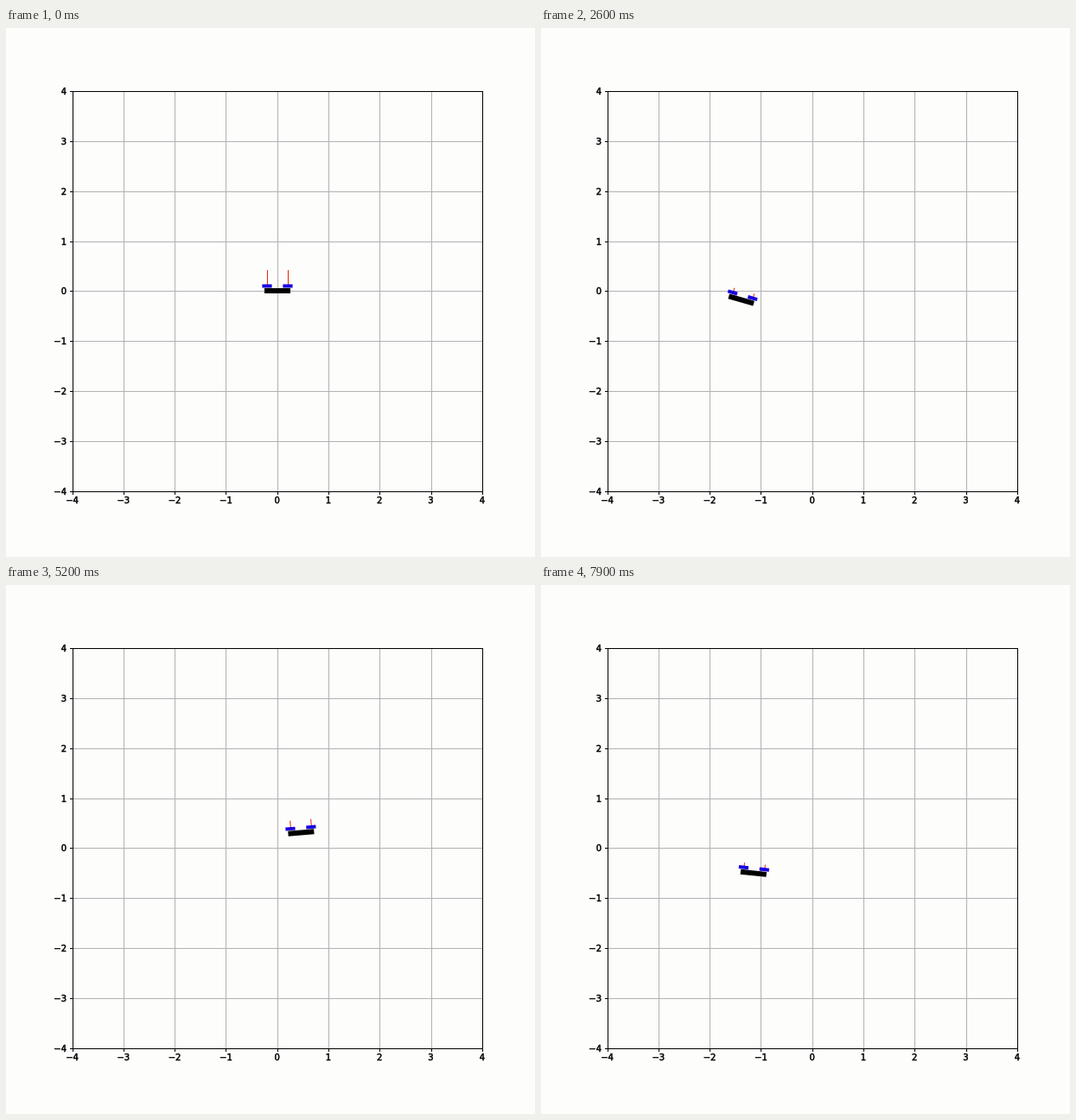
Animation, 612 px wide and 612 px high, one loop 8000 ms. Source, as an HTML page with a canvas:

```html
<!DOCTYPE html>
<html lang="en">
<head>
<meta charset="utf-8">
<title>Twin-rotor flight</title>
<style>
html, body { margin: 0; width: 100%; height: 100%; overflow: hidden; background: #fdfdfc; }
canvas { display: block; width: 612px; height: 612px; }
</style>
</head>
<body>
<canvas id="stage" width="612" height="612"></canvas>
<script>
const ctx = document.getElementById('stage').getContext('2d');
const LOOP = 8000, STEP = 100;
const LEFT = 77, RIGHT = 551, TOP = 73, BOTTOM = 536;
const ARM = 12;
const rad = deg => deg * Math.PI / 180;
const gridX = i => Math.round(76.5 + 59.29 * i);
const gridY = i => Math.round(73 + 57.86 * i);

// Steady swing that peaks at the given second
const swing = (t, peak) => Math.cos(rad(68 * (t - peak)));
// Passing disturbance during take-off
const bump = (t, mid, width) => Math.exp(-(((t - mid) / width) ** 2));

// A steady orbit, disturbed while the drone settles into it
const flight = t => ({
  x: 293.2 + 49.6 * swing(t, 5)
    - 26.8 * bump(t, -0.08, 0.45) + 12 * bump(t, 0.95, 0.45) - 14 * bump(t, 2.6, 0.5),
  y: 308.3 - 58 * swing(t, 6.2)
    + 30 * bump(t, 0.2, 0.4) - 23 * bump(t, 2.2, 0.85),
  tilt: 0.6 - 6.3 * swing(t, 4.75)
    + 12 * bump(t, 0.2, 0.2) - 17 * bump(t, 0.65, 0.25) + 10.2 * bump(t, 2.6, 0.5),
  thrust: 7.4 + 2 * swing(t, 4.9) + 9.3 * bump(t, 0, 0.35)
});

function box(color, x, y, w, h) {
  ctx.fillStyle = color;
  ctx.fillRect(x, y, w, h);
}

function label(text, align, x, y) {
  ctx.textAlign = align;
  ctx.fillStyle = '#000';
  ctx.fillText(text, x, y);
  ctx.strokeText(text, x, y);
}

function drawAxes() {
  box('#fdfdfc', 0, 0, 612, 612);
  for (let i = 0; i <= 8; i++) {
    box('#b2b2b2', gridX(i), TOP, 1, BOTTOM - TOP);
    box('#b2b2b2', LEFT, gridY(i), RIGHT - LEFT, 1);
  }
  ctx.font = '10px "DejaVu Sans", sans-serif';
  ctx.strokeStyle = '#000';
  ctx.lineWidth = 0.5;
  for (let i = 0; i <= 8; i++) {
    const text = String(i - 4).replace('-', '\u2212');
    const up = 8 - i;
    box('#000', gridX(i), BOTTOM, 1, 4);
    box('#000', LEFT - 3, gridY(up), 3, 1);
    label(text, 'center', 76.5 + 59.29 * i, 550);
    label(text, 'right', 70, gridY(up) + 4);
  }
  ctx.lineWidth = 1;
  ctx.strokeRect(LEFT + 0.5, TOP + 0.5, RIGHT - LEFT, BOTTOM - TOP);
}

function drawDrone(t) {
  const { x, y, tilt, thrust } = flight(t);
  ctx.save();
  ctx.translate(x, y);
  ctx.rotate(rad(tilt));
  for (const side of [-ARM, ARM]) {
    box('#e02400', side, -5.5 - thrust, 1, thrust);
    box('#1a00e0', side - 5.6, -7.5, 11.2, 4);
  }
  box('#000', -15, -3, 30, 6);
  ctx.restore();
}

function frame(now) {
  const ms = Math.floor((now % LOOP) / STEP) * STEP;
  drawAxes();
  drawDrone(ms / 1000);
  requestAnimationFrame(frame);
}

frame(0);
</script>
</body>
</html>
```
